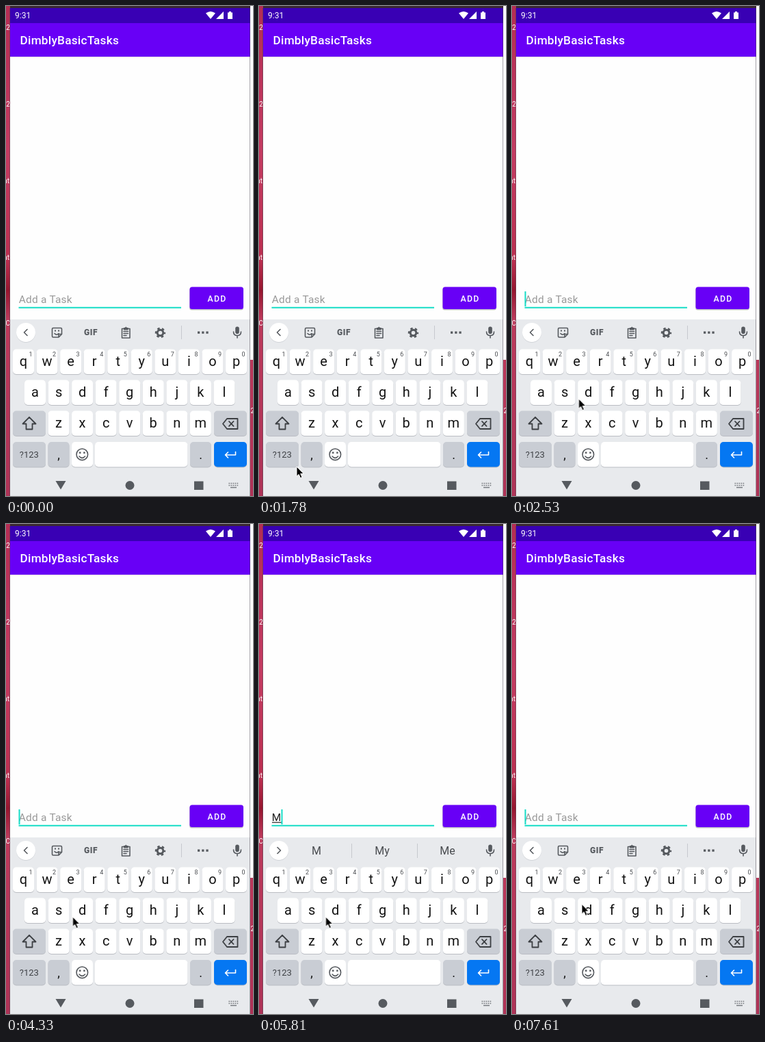
Write an HTML page that moves like this. It is 361 px wide and 716 px high and loops after 8 s.

```html
<!DOCTYPE html>
<html lang="en">
<head>
<meta charset="utf-8">
<title>To-do app</title>
<style>
html, body { margin: 0; width: 100%; height: 100%; overflow: hidden; background: #fff; }
svg { display: block; width: 361px; height: 716px; font-family: Roboto, sans-serif; }

.mid { text-anchor: middle; }
.key { fill: #fff; }
.key.alt { fill: #c9cdd4; }
.key.go { fill: #0577f2; }
.letter { font-size: 20px; fill: #141414; text-anchor: middle; }
.digit { font-size: 9px; fill: #4b4e52; text-anchor: middle; }
.icon { fill: none; stroke: #565a5f; stroke-width: 1.6; stroke-linejoin: round; stroke-linecap: round; }
.icon.dark { stroke: #3c3f43; stroke-width: 1.8; }
.solid { fill: #565a5f; }
.word { font-size: 16px; fill: #494c50; text-anchor: middle; }
.field { font-size: 15.4px; letter-spacing: .25px; }
.desk { font-size: 10px; fill: #fff; text-anchor: end; }

/* Every timeline shares one 8 s loop and holds each state until the next. */
.anim { animation: 8s step-end infinite; }
#caret { animation-name: blink; }
#caret rect { animation-name: caret-shift; }
#hint { animation-name: empty; }
#typed { animation-name: typed; }
#underline { animation-name: underline; }
#tools { animation-name: tools; }
#words { animation-name: words; }
#lower { animation-name: lower; }
#upper { animation-name: upper; }
#pointer { animation-name: pointer; }

@keyframes blink {
  0%, 11.25%, 22.25%, 35.375%, 48.5%, 61.625%, 89.5% { opacity: 0; }
  3.75%, 16.75%, 29.75%, 42.875%, 54.125%, 67.125%, 95.125% { opacity: 1; }
}
@keyframes caret-shift {
  0%, 82% { transform: none; }
  69% { transform: translateX(14px); }
}
@keyframes empty { 0%, 82% { opacity: 1; } 69% { opacity: 0; } }
@keyframes typed { 0%, 82% { opacity: 0; } 69% { opacity: 1; } }
@keyframes underline { 0%, 82% { opacity: 0; } 70.75% { opacity: 1; } }
@keyframes tools {
  0%, 83.875% { opacity: 1; }
  70.75%, 82% { opacity: .4; }
  72.625% { opacity: 0; }
}
@keyframes words {
  0%, 83.875% { opacity: 0; }
  70.75%, 82% { opacity: .4; }
  72.625% { opacity: 1; }
}
@keyframes lower { 0%, 69% { opacity: 1; } 67.125% { opacity: 0; } }
@keyframes upper { 0%, 69% { opacity: 0; } 67.125% { opacity: 1; } }
@keyframes pointer {
  0% { opacity: 0; transform: translate(38px, 702px); }
  20.5% { opacity: 1; transform: translate(38px, 702px); }
  22.25% { opacity: 1; transform: translate(55px, 673px); }
  24.125% { opacity: 1; transform: translate(69px, 640px); }
  26% { opacity: 1; transform: translate(83px, 606px); }
  27.875% { opacity: 1; transform: translate(93px, 585px); }
  29.75% { opacity: 1; transform: translate(97.5px, 574px); }
  74.5% { opacity: 1; transform: translate(99px, 567px); }
  76.375% { opacity: 1; transform: translate(101px, 560px); }
  78.25%, 100% { opacity: 1; transform: translate(102px, 555.5px); }
}
</style>
</head>
<body>
<svg viewBox="0 0 361 716">
  <defs>
    <linearGradient id="wall" x2="0" y2="1">
      <stop offset="0" stop-color="#b52d54"/>
      <stop offset=".3" stop-color="#c43c62"/>
      <stop offset=".52" stop-color="#bb2f50"/>
      <stop offset=".58" stop-color="#96162f"/>
      <stop offset=".64" stop-color="#bd3a5c"/>
      <stop offset="1" stop-color="#ae3357"/>
    </linearGradient>
  </defs>

  <!-- Desktop behind the phone -->
  <path fill="url(#wall)" d="M0 0H361V716H0Z"/>
  <path fill="#fff" d="M357 0h4v517h-4z"/>
  <path fill="#3b2933" d="M6 0H357V3H6Z"/>
  <g class="desk">
    <text x="6" y="35">02</text><text x="6" y="147">02</text>
    <text x="5" y="259">at</text><text x="5" y="371">at</text>
    <text x="6" y="467">C</text><text x="363" y="595">2</text>
  </g>

  <!-- App -->
  <path fill="#fefefe" d="M6 3H357V716H6Z"/>
  <path fill="#3900b4" d="M6 3H357V25H6Z"/>
  <path fill="#6800f6" d="M6 25H357V74H6Z"/>
  <path fill="#000" opacity=".1" d="M6 74H357V75H6Z"/>
  <g fill="#fff">
    <text x="13" y="18.300" font-size="12">9:31</text>
    <path d="M292 10.500Q299 5.500 306 10.500L299 19ZM307 19L318 8V19ZM324 9.500h2v-1.500h3v1.500h2V19h-7z"/>
    <text x="20.500" y="56.300" font-size="17.200" font-weight="500" letter-spacing=".25">DimblyBasicTasks</text>
  </g>

  <!-- Entry row -->
  <g class="field">
    <text id="hint" class="anim" x="18.800" y="433.700" fill="#989898">Add a Task</text>
    <text id="typed" class="anim" x="18.800" y="433.700" fill="#222">M</text>
  </g>
  <path id="underline" class="anim" fill="#222" d="M19 435.500h14v1.200h-14z"/>
  <path fill="#14dcc6" d="M18.500 439.800h237.500v1.900H18.500z"/>
  <g id="caret" class="anim"><rect class="anim" x="18.500" y="417" width="2" height="22" fill="#14dcc6"/></g>
  <rect x="268" y="412" width="79" height="32.500" rx="3.500" fill="#000" opacity=".22"/>
  <rect x="268.500" y="410.500" width="78.500" height="32.500" rx="3.500" fill="#6800f6"/>
  <text class="mid" x="308.500" y="431.800" font-size="12.300" font-weight="500" letter-spacing="1.200" fill="#fff">ADD</text>

  <!-- Keyboard -->
  <path fill="#e8eaed" d="M6 458H357V716H6Z"/>
  <circle cx="29" cy="477.800" r="14" fill="#c9ccd1"/>
  <circle cx="29" cy="477" r="14" fill="#fff"/>

  <g id="tools" class="anim">
    <path class="icon" d="M31 472.500L26.500 477L31 481.500"/>
    <path class="icon" d="M69 470.500h11q1.500 0 1.500 1.500v7.500l-4.500 4.500h-8q-1.500 0-1.500-1.500v-10.500q0-1.500 1.500-1.500zM77 484v-4.500h4.500M71 478.500q3 3.500 6 0"/>
    <path class="solid" d="M71 473.500h2v2h-2zM76 473.500h2v2h-2z"/>
    <text class="mid solid" x="124" y="481.300" font-size="12" font-weight="900" letter-spacing=".6">GIF</text>
    <path class="icon" d="M169.500 471.500h11.500v13.500h-11.500zM172 475.500h6.500M172 478.500h6.500M172 481.500h4"/>
    <path class="solid" d="M172 470h2q1.300-2.500 2.600 0h2v3.500H172z"/>
    <g transform="translate(225.500 477.500)" fill="none" stroke="#565a5f">
      <circle r="4.300" stroke-width="3"/>
      <circle r="6.400" stroke-width="2.600" stroke-dasharray="3.351" stroke-dashoffset="1.676"/>
    </g>
    <path fill="#c6c9ce" d="M256 467h1v20h-1z"/>
    <path class="solid" d="M280 475.500h3.300v3.300H280zM286.200 475.500h3.300v3.300h-3.300zM292.400 475.500h3.300v3.300h-3.300z"/>
  </g>

  <g id="words" class="anim">
    <path class="icon" d="M27 472.500L31.500 477L27 481.500"/>
    <text class="word" x="84" y="483">M</text>
    <text class="word" x="180" y="483">My</text>
    <text class="word" x="275.500" y="483">Me</text>
    <path fill="#c6c9ce" d="M135 467h1v21h-1zM231 467h1v21h-1z"/>
  </g>

  <rect class="solid" x="335.200" y="468.500" width="5.600" height="10.500" rx="2.800"/>
  <path class="icon" d="M332.500 476q0 5.500 5.500 5.500t5.500-5.500M338 482v3"/>

  <g id="keys"></g>
  <g id="lower" class="anim"><path class="icon dark" d="M34 600.800L43.500 610.500H38.500V618.500H29.500V610.500H24.500Z"/></g>
  <g id="upper" class="anim"><path class="icon dark" style="fill:#3c3f43" d="M34 600.800L43.500 610.500H38.500V618.500H29.500V610.500H24.500Z"/></g>

  <path class="icon dark" d="M323 603H338.500V618H323L317 610.500ZM326 607l6.500 6.800M332.500 607l-6.500 6.800"/>
  <text class="mid" x="33.800" y="660.300" font-size="13" fill="#3f4246">?123</text>
  <text class="letter" x="77" y="662" style="font-size:18px">,</text>
  <text class="letter" x="284.500" y="662" style="font-size:18px">.</text>
  <circle class="icon" cx="111.300" cy="655.300" r="8.300"/>
  <path class="icon" d="M107 658q4.300 4.800 8.600 0"/>
  <path class="solid" d="M107 651.500h2.400v2.600h-2.400zM113.200 651.500h2.400v2.600h-2.400z"/>
  <path class="icon" style="stroke:#fff" d="M335.500 651.500V656H320.500M324.500 652L320.500 656L324.500 660"/>

  <!-- Navigation bar -->
  <path class="solid" d="M72.500 694H87.500L80 706.500ZM275 694.500h13.500V707H275z"/>
  <circle class="solid" cx="181" cy="700.500" r="6.500"/>
  <path fill="none" stroke="#777b80" stroke-width="1.500" stroke-dasharray="1.700 1.300" d="M325.500 697.500h14M325.500 700.500h14"/>
  <path fill="#777b80" d="M328 702.800h9v1.500h-9z"/>
  <path fill="#4a4450" opacity=".5" d="M5 3h1v713h-1zM356 3h1v713h-1z"/>

  <path id="pointer" class="anim" fill="#000" stroke="#fff" stroke-width="1" stroke-linejoin="round" d="M0 0V14.300L3.200 11.400L5.500 16.700L8 15.600L5.700 10.500H10.200Z"/>
</svg>

<script>
const NS = 'http://www.w3.org/2000/svg';
const [keys, lower, upper] = ['keys', 'lower', 'upper'].map(id => document.getElementById(id));
const STEP = 34.56;

function add(parent, tag, attrs, text = '') {
  const el = document.createElementNS(NS, tag);
  for (const name in attrs) el.setAttribute(name, attrs[name]);
  el.textContent = text;
  parent.append(el);
}

function key(x, y, width = 31, kind = '') {
  const box = { x, width, height: 36.5, rx: 5 };
  add(keys, 'rect', { ...box, y: y + 1, fill: '#babdc3' });
  add(keys, 'rect', { ...box, y, class: 'key ' + kind });
}

function row(letters, x0, y) {
  [...letters].forEach((ch, i) => {
    const x = x0 + i * STEP;
    const at = { x: x + 15.5, y: y + 24.6, class: 'letter' };
    key(x, y);
    add(lower, 'text', at, ch);
    add(upper, 'text', at, ch.toUpperCase());
  });
}

row('qwertyuiop', 10, 501.5);
row('asdfghjkl', 27, 546.5);
row('zxcvbnm', 61.5, 591.5);

for (let i = 0; i < 10; i++) {
  add(keys, 'text', { x: 36 + i * STEP, y: 512, class: 'digit' }, (i + 1) % 10);
}

key(10, 591.5, 48, 'alt');
key(304, 591.5, 48, 'alt');
key(10, 637, 48, 'alt');
key(61.5, 637, 31, 'alt');
key(96, 637);
key(130, 637, 135.5);
key(269, 637, 31, 'alt');
key(304, 637, 48, 'go');
</script>
</body>
</html>
```
